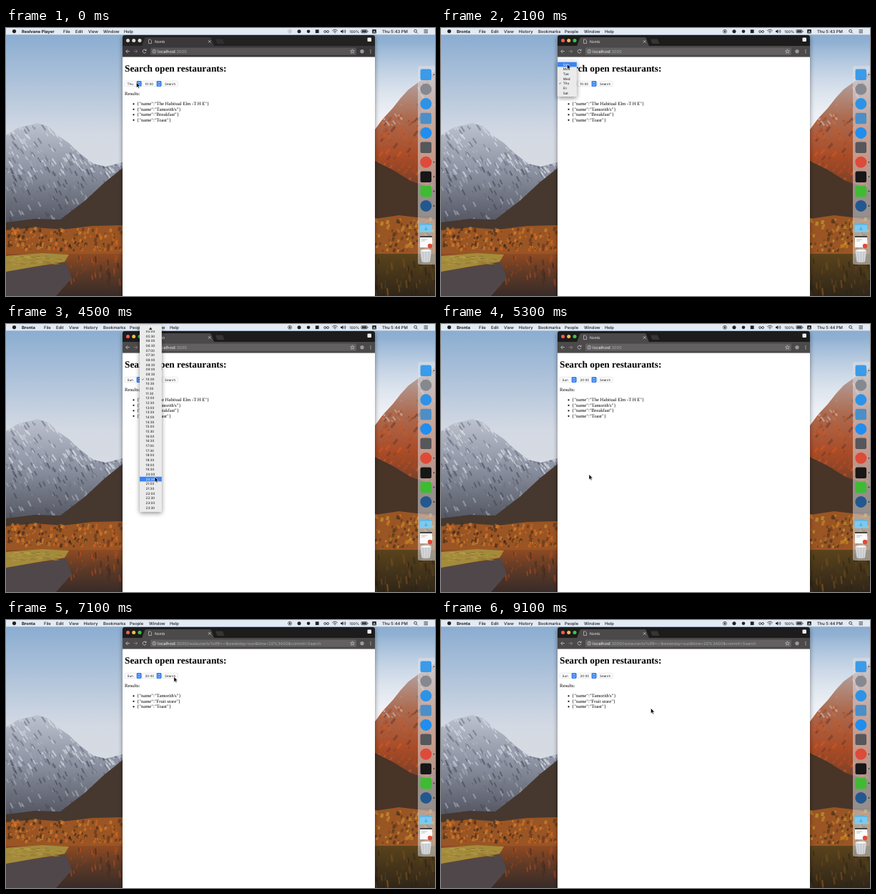
Write an HTML page that moves like this. It is 600 by 375 pixels and loops after 9.2 s.

```html
<!DOCTYPE html>
<html lang="en">
<head>
<meta charset="utf-8">
<title>Restaurant search</title>
<style>
html, body { margin: 0; width: 100%; height: 100%; overflow: hidden; }
svg { display: block; width: 600px; height: 375px; }
text { font-family: Inter, "DejaVu Sans", sans-serif; text-rendering: geometricPrecision; white-space: pre; }
.bar text { font-size: 5.83px; font-weight: 500; fill: #1b1b1b; }
.bar .app { font-weight: 700; }
.small text { font-size: 4.58px; fill: #111; }
.page text { font-family: "Liberation Serif", "Noto Serif", serif; font-size: 6.67px; }
.page .title { font-size: 13.33px; font-weight: 700; }
</style>
</head>
<body>
<svg id="stage" viewBox="0 0 600 375">
  <defs>
    <linearGradient id="sky" x2="0" y2="1"><stop stop-color="#86aad0"/><stop offset=".7" stop-color="#d3d9e3"/><stop offset="1" stop-color="#d8dbe2"/></linearGradient>
    <linearGradient id="haze" x2="0" y2="1"><stop stop-color="#fff" stop-opacity="0"/><stop offset="1" stop-color="#f4f5f8"/></linearGradient>
    <linearGradient id="rock" x2="0" y2="1"><stop stop-color="#bcc2ce"/><stop offset=".45" stop-color="#8b91a1"/><stop offset="1" stop-color="#4a4c56"/></linearGradient>
    <linearGradient id="red" x2="0" y2="1"><stop stop-color="#b5aeb2"/><stop offset=".35" stop-color="#ad6b50"/><stop offset=".65" stop-color="#a94b26"/><stop offset="1" stop-color="#5b3a2b"/></linearGradient>
    <linearGradient id="lake" x2="0" y2="1"><stop stop-color="#8f4a22"/><stop offset=".45" stop-color="#5e3a27"/><stop offset="1" stop-color="#382b28"/></linearGradient>
    <linearGradient id="pond" x2="0" y2="1"><stop stop-color="#5a431c"/><stop offset="1" stop-color="#2f2518"/></linearGradient>
    <filter id="shade" x="-20%" y="-10%" width="140%" height="120%"><feDropShadow dx="0" dy="2" stdDeviation="3" flood-opacity=".45"/></filter>
    <clipPath id="peak"><path d="M0 150 18 139 32 136 44 133 60 138 72 150 88 161 104 176 122 190 140 194 163 188V285H0Z"/></clipPath>
    <clipPath id="slope"><path d="M516 142 528 126 541 112 552 98 563 86 585 70 600 60V245H516Z"/></clipPath>
    <clipPath id="list"><rect x="180" y="9" width="45" height="253"/></clipPath>
  </defs>

  <rect width="600" height="210" fill="url(#sky)"/>
  <rect x="516" y="20" width="84" height="125" fill="url(#haze)"/>
  <g clip-path="url(#peak)"><rect y="133" width="163" height="152" fill="url(#rock)"/><g id="snow"/></g>
  <g clip-path="url(#slope)"><rect x="516" y="60" width="84" height="185" fill="url(#red)"/><g id="scree"/></g>
  <path d="M0 272 40 267 76 268 110 242 138 216 163 196V300H0Z" fill="#46382f"/>
  <path d="M516 186 540 198 566 214 600 226V320H516Z" fill="#483528"/>
  <path d="M0 283 40 279 80 282 120 277 163 276V322H0ZM516 267 550 262 600 268V322H516Z" fill="#9a5524"/>
  <g id="trees"/>
  <rect y="316" width="163" height="59" fill="url(#lake)"/>
  <rect x="516" y="316" width="84" height="59" fill="url(#pond)"/>
  <g id="ripples"/>
  <path d="M0 340 40 335 84 328 92 350 70 375H0Z" fill="#50474a"/>
  <path d="M0 319 50 315 88 317 82 327 40 334 0 341Z" fill="#a48b3c"/>
  <g id="reeds"/>

  <g filter="url(#shade)">
    <path id="frame" d="M163 375V13q0-3 3-3H513q3 0 3 3V375Z"/>
    <g id="tab">
      <path d="M190 25.5 194 14.5q.6-1.500 2-1.500H285q1.400 0 2 1.500L291 25.500Z"/>
      <path d="M293 15.500h9q1 0 1.400 1l2 5.500h-9q-1 0-1.400-1Z" opacity=".55"/>
      <rect x="163" y="25" width="353" height="15.500"/>
    </g>
    <rect x="163" y="40.500" width="353" height="334.500" fill="#fff"/>
  </g>
  <g id="lights"/>
  <path d="M199.500 16h2.500l1.500 1.500v4h-4Z" fill="none" stroke="#ddd" stroke-width=".6"/>
  <text x="208" y="21" font-size="5" fill="#eee">Nomb</text>
  <path d="m283 17.200 3.400 3.400m0-3.400-3.400 3.400" stroke="#ddd" stroke-width=".7"/>
  <rect x="505.500" y="13.500" width="5.500" height="5.500" rx="1" fill="#eee"/>
  <g fill="none" stroke="#c8c8c8" stroke-width=".8">
    <path d="M173 32.700h-5.200m2.400-2.500-2.400 2.500 2.400 2.500"/>
    <path d="M178.500 32.700h5.200m-2.400-2.500 2.400 2.500-2.400 2.500" opacity=".5"/>
    <path d="M195.600 31a2.500 2.500 0 1 0 .4 2.500m.1-4v2h-2"/>
  </g>
  <rect id="field" x="202" y="27.500" width="288" height="10.300" rx="1.300"/>
  <circle cx="207.300" cy="32.700" r="2.400" fill="none" stroke="#ddd" stroke-width=".6"/>
  <path d="M207.300 31.300v.7m0 .5v1.700" stroke="#ddd" stroke-width=".7"/>
  <text x="212" y="34.800" font-size="5.830" fill="#f5f5f5">localhost<tspan id="path" font-size="5.700" fill="#aaa"></tspan></text>
  <path d="m484.500 29.800.8 2 2.100.1-1.600 1.400.5 2-1.800-1.100-1.800 1.100.5-2-1.600-1.400 2.100-.1Z" fill="none" stroke="#ddd" stroke-width=".6"/>
  <circle cx="498" cy="32.700" r="2.700" fill="#999"/>
  <g fill="#ccc"><circle cx="510" cy="30.600" r=".65"/><circle cx="510" cy="32.700" r=".65"/><circle cx="510" cy="34.800" r=".65"/></g>

  <g class="page">
    <text class="title" x="166" y="61.300">Search open restaurants:</text>
    <text x="166" y="94">Results:</text>
    <g id="results"/>
  </g>
  <g class="small" id="form"/>

  <g id="dock">
    <path d="M600 53h-21q-3 0-3 3V328q0 3 3 3h21Z" fill="#dfe1e6" opacity=".52"/>
    <path d="M578 264h20" stroke="#777" stroke-width=".5" opacity=".6"/>
    <path d="M578.500 273.500q0-1 1-1h5l1.500 1.500h9q1 0 1 1V285q0 1-1 1h-15.500q-1 0-1-1Z" fill="#63b8e4"/>
    <path d="M578.500 276h17.500v9q0 1-1 1h-15.500q-1 0-1-1Z" fill="#7bcaf0"/>
    <path d="M587.300 278v5m-2-2 2 2 2-2" fill="none" stroke="#4a9fca"/>
    <rect x="579" y="291" width="17" height="16" fill="#fafafa"/>
    <path d="M579 291h17v2h-17Z" fill="#444"/>
    <path d="M581 296h8m-8 2h5" stroke="#999" stroke-width=".6"/>
    <circle cx="593" cy="305" r="3.200" fill="#dd4b39"/>
    <path d="M579.500 311.500 581.500 327q5.500 2 11.500 0l2-15.500Z" fill="#d9dde1" opacity=".9"/>
    <path d="m583 313 1 14m3.300-14v15m4.200-15-1 14" stroke="#a5abb1" stroke-width=".5"/>
    <ellipse cx="587.300" cy="311.500" rx="7.800" ry="2" fill="#f5f6f7" stroke="#a5abb1" stroke-width=".5"/>
  </g>

  <g class="bar">
    <rect width="600" height="9.300" fill="#e4eaf2"/>
    <circle cx="11.500" cy="4.600" r="2.600" fill="#222"/>
    <g id="menus"/>
    <g id="record"><circle cx="397" cy="4.700" r="2.500" fill="none" stroke="#222" stroke-width=".7"/><rect x="396" y="3.700" width="2" height="2" fill="#222"/></g>
    <g fill="#222"><circle cx="410" cy="4.700" r="2.500"/><circle cx="423" cy="4.700" r="2.300"/><rect x="432.800" y="2.300" width="4.800" height="4.800"/></g>
    <g fill="none" stroke="#222" stroke-width=".8">
      <circle cx="446.200" cy="5" r="1.500"/><circle cx="450" cy="5" r="1.500"/>
      <path d="M456.300 3.800q3.700-3.300 7.400 0m-6 1.500q2.300-2 4.600 0m-3.200 1.500q.9-.8 1.800 0"/>
      <path d="M472.500 3.300q1 1.400 0 2.800m1.500-3.900q2 2.500 0 5"/>
      <rect x="497" y="2.700" width="8" height="4" rx=".7"/><path d="M506 4v1.500"/>
      <circle cx="572.600" cy="4.200" r="1.900"/><path d="m574 5.700 1.800 1.800M584.500 2.700h5.500m-5.500 2h5.500m-5.500 2h5.500"/>
    </g>
    <path d="M468 3.700h1.300l2-1.700v5.500l-2-1.700H468ZM498 3.600h6v2.200h-6Z" fill="#222"/>
    <text x="480.500" y="6.800" style="font-size:5px">100%</text>
    <rect x="512.200" y="1.900" width="5.700" height="5.700" rx=".8" fill="#222"/>
    <text x="513.500" y="6.500" style="font-size:4.8px;fill:#fff">A</text>
    <text id="clock" x="526" y="6.800"></text>
  </g>

  <g class="small" id="popups"/>
  <path id="cursor" d="M0 0V7.200L1.700 5.700 2.800 8.200 4 7.700 2.900 5.200H5.200Z" fill="#000" stroke="#fff" stroke-width=".5"/>
</svg>
<script>
const LOOP = 9200, ROW = 20 / 3, BLUE = "#3b83f3";
const $ = id => document.getElementById(id);
function el(tag, attrs, parent, text = "") {
  const node = document.createElementNS("http://www.w3.org/2000/svg", tag);
  for (const k in attrs) node.setAttribute(k, attrs[k]);
  node.textContent = text;
  parent.append(node);
  return node;
}
const label = (parent, text, x, y, more) => el("text", { x, y, ...more }, parent, text);
const show = (node, on) => node.setAttribute("visibility", on ? "visible" : "hidden");

// Scenery texture
let seed = 7;
const rnd = () => (seed = seed * 16807 % 2147483647) / 2147483647;
function flecks(id, n, [x, y, w, h], dx, dy, thick, colors) {
  for (let i = 0; i < n; i++) {
    const s = .4 + rnd();
    el("path", {
      d: `M${x + rnd() * w} ${y + rnd() * h}l${dx * s} ${dy * s}`,
      stroke: colors[i % colors.length], "stroke-width": thick * s, opacity: .6
    }, $(id));
  }
}
flecks("snow", 200, [0, 133, 163, 70], 4, 6, 1.8, ["#dde1e8", "#6a7182", "#e6e9ee"]);
flecks("snow", 200, [0, 185, 163, 85], 3, 6, 1.8, ["#a9afbc", "#454853", "#6b707e"]);
flecks("scree", 60, [516, 62, 84, 75], 4, 5, 2, ["#c9c6cb", "#85706c", "#b3816c"]);
flecks("scree", 110, [516, 120, 84, 110], -4, 5, 2.4, ["#cf5a24", "#6e3c2a", "#b04a22"]);
flecks("trees", 170, [0, 283, 163, 30], 1, -4, 3, ["#d9691f", "#5a321c", "#d98a30", "#33261c"]);
flecks("trees", 100, [516, 270, 84, 44], 1, -4, 3, ["#d08a26", "#6b3b1c", "#c9a232", "#3b2c1a"]);
flecks("ripples", 60, [55, 318, 108, 34], 1, 7, 2, ["#bd4f1e", "#472a1d", "#a3461f"]);
flecks("ripples", 50, [516, 318, 84, 50], 1, 9, 2, ["#7a4e1c", "#2a2116", "#54441e"]);
flecks("reeds", 60, [0, 319, 72, 12], 6, 0, 1, ["#c4ab58", "#7d6c2c"]);

// Dock tiles: c = circle, s = square
const tiles = ["s#3a9bea", "c#85898f", "c#2d93e6", "s#4c8fc6", "c#1f8ef0", "s#55575b", "c#dd4b39", "s#171717", "s#3fbb33", "c#23588f"];
tiles.forEach((tile, i) => {
  const y = 65.3 + i * 20.4, fill = tile.slice(1);
  if (tile[0] === "c") el("circle", { cx: 587.3, cy: y, r: 8, fill }, $("dock"));
  else el("rect", { x: 579.5, y: y - 7.7, width: 15.5, height: 15.5, rx: 2.5, fill }, $("dock"));
  if (!i || i > 5) el("circle", { cx: 598.4, cy: y, r: .8, fill: "#111" }, $("dock"));
});

// Menu bar
function menuBar(names, xs) {
  const g = el("g", {}, $("menus"));
  names.forEach((name, i) => label(g, name, xs[i], 6.8, i ? {} : { class: "app" }));
  return g;
}
const idleBar = menuBar(["Reelvane Player", "File", "Edit", "View", "Window", "Help"], [22, 80, 97, 115, 136, 165]);
const activeBar = menuBar(["Bronta", "File", "Edit", "View", "History", "Bookmarks", "People", "Window", "Help"],
  [22, 53, 70, 88, 108.5, 136, 173, 200, 229]);

const lights = [170.5, 178.7, 187].map(cx => el("circle", { cx, cy: 17.5, r: 2.5 }, $("lights")));

// Form controls
function control(x, w) {
  return el("rect", { x, y: 74.3, width: w, height: 7.5, rx: 1.4, fill: "#fff", stroke: "#c4c4c4", "stroke-width": .4 }, $("form"));
}
function select(x, w) {
  control(x, w);
  el("rect", { x: x + w - 7, y: 74.1, width: 7, height: 7.9, rx: 1.4, fill: BLUE }, $("form"));
  el("path", {
    d: `M${x + w - 4.9} 77.3l1.4-1.5 1.4 1.5m-2.8 1.5 1.4 1.5 1.4-1.5`,
    fill: "none", stroke: "#fff", "stroke-width": .65
  }, $("form"));
  return label($("form"), "", x + 3.4, 79.7);
}
const daySelect = select(166.2, 23.4), timeSelect = select(191, 26.5);
const button = control(219, 21.3);
label($("form"), "Search", 222, 79.7);

// Result lists
function resultList(names) {
  const g = el("g", {}, $("results"));
  names.forEach((name, i) => {
    const y = 108.3 + i * 7.5;
    el("circle", { cx: 178.5, cy: y - 2, r: 1.1 }, g);
    label(g, `{"name":"${name}"}`, 183, y);
  });
  return g;
}
const before = resultList(["The Habitual Elm -T H E", "Tamorith's", "Breakfast", "Toast"]);
const after = resultList(["Tamorith's", "Fruit store", "Toast"]);

// Popup menus: top is the upper edge of the first row
function popup(x, y, w, h, top, items, checked, indent, clip) {
  const g = el("g", {}, $("popups"));
  el("rect", { x, y, width: w, height: h, rx: 1.8, fill: "#ebebeb", filter: "url(#shade)" }, g);
  const rows = el("g", clip ? { "clip-path": clip } : {}, g);
  const bar = el("rect", { x, width: w, height: ROW, fill: BLUE }, rows);
  const lines = items.map((item, i) => {
    const line = el("g", {}, rows), base = top + i * ROW + 5;
    label(line, item, x + indent, base);
    if (i === checked) label(line, "✓", x + indent - 6.4, base);
    return line;
  });
  return (open, cursorY) => {
    show(g, open);
    const hot = Math.floor((cursorY - top) / ROW);
    bar.setAttribute("y", top + hot * ROW);
    lines.forEach((line, i) => {
      for (const t of line.children) t.style.fill = i === hot ? "#fff" : "#111";
    });
    return g;
  };
}
const days = ["Sun", "Mon", "Tue", "Wed", "Thu", "Fri", "Sat"];
const times = Array.from({ length: 38 }, (_, i) => `${10 + i >> 1}`.padStart(2, "0") + (i % 2 ? ":30" : ":00"));
const dayMenu = popup(162.8, 45.8, 27, 50.3, 47.7, days, 4, 8);
const timeMenu = popup(187, 1.8, 30.8, 261, 73.7 - 10 * ROW, times, 10, 8.6, "url(#list)");
el("path", { d: "M199.8 8 202.2 4.5 204.6 8Z", fill: "#333" }, timeMenu(false, 0));

// Pointer path: time, x, y
const track = [
  [0, 182.5, 76.3], [1300, 182.5, 76.3], [2000, 176.5, 50.5], [2400, 176.5, 50.5],
  [3100, 206, 75], [3600, 206, 75], [4400, 208, 214], [4600, 208, 214],
  [4900, 207, 210.5], [5300, 207, 210.5], [5900, 232.5, 78.5], [6900, 232.5, 78.5],
  [7600, 244.5, 83.5], [8300, 244.5, 83.5], [9000, 293.5, 123.5], [LOOP, 293.5, 123.5]
];
function pointer(t) {
  const i = track.findIndex(k => k[0] > t), [t0, x0, y0] = track[i - 1], [t1, x1, y1] = track[i];
  const p = (t - t0) / (t1 - t0), e = p * p * (3 - 2 * p);
  return [x0 + (x1 - x0) * e, y0 + (y1 - y0) * e];
}

function draw() {
  const t = Math.floor(performance.now() % LOOP / 100) * 100;
  const [x, y] = pointer(t), active = t >= 500, loaded = t >= 6500;
  $("cursor").setAttribute("transform", `translate(${x} ${y})`);
  show(idleBar, !active);
  show(activeBar, active);
  $("record").style.opacity = active ? 1 : .3;
  $("frame").style.fill = active ? "#1e1c1d" : "#242223";
  $("tab").style.fill = active ? "#4b494a" : "#3b393a";
  $("field").style.fill = active ? "#626061" : "#565455";
  lights.forEach((c, i) => c.style.fill = active ? ["#fc5b57", "#fdbc40", "#34c84a"][i] : "#dcd9da");
  $("clock").textContent = t < 4000 ? "Thu 5:43 PM" : "Thu 5:44 PM";
  $("path").textContent = ":3000" + (loaded ? "/restaurants?utf8=✓&weekday=sun&time=20%3A00&commit=Search" : "");
  daySelect.textContent = t < 2400 ? "Thu" : "Sun";
  timeSelect.textContent = t < 5300 ? "10:00" : "20:00";
  button.style.fill = t >= 6000 && t < 6300 ? "#2b6fe3" : "#fff";
  show(before, !loaded);
  show(after, loaded);
  dayMenu(t >= 800 && t < 2400, y);
  timeMenu(t >= 3200 && t < 5300, y);
  requestAnimationFrame(draw);
}
draw();
</script>
</body>
</html>
```
